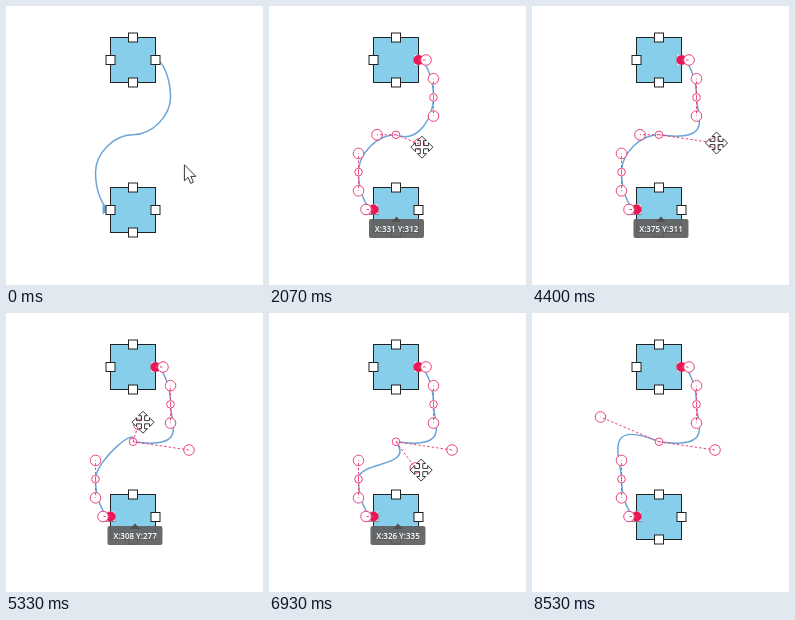
Write an HTML page that moves like this. It is 257 px wide and 279 px high and loops after 9070 ms.

```html
<!DOCTYPE html>
<html lang="en">
<head>
<meta charset="utf-8">
<title>Bezier connector editing</title>
<style>
html, body { margin: 0; width: 100%; height: 100%; overflow: hidden; background: #fff; }
svg { display: block; width: 257px; height: 279px; }
.handles { fill: #fff; stroke: #eb447c; }
.links { fill: none; stroke: #eb447c; stroke-dasharray: 2.5 2; }
.cursor { fill: #fff; stroke: #222; stroke-width: .9; stroke-linejoin: round; }
text { font: 600 8px "Open Sans", "Noto Sans", sans-serif; fill: #fff; text-anchor: middle; }
</style>
</head>
<body>
<svg viewBox="0 0 257 279">
  <g id="nodes" fill="#87ceeb" stroke="#222"></g>
  <path id="curve" fill="none" stroke="#6ba5d7" stroke-width="1.5"/>
  <path d="M97 199.5 104.5 203.5 97 207.5Z" fill="#6ba5d7" stroke="#6ba5d7"/>
  <g id="ports" fill="#fff" stroke="#222"></g>
  <g id="edit">
    <g id="ends"></g>
    <g id="handles" class="handles"></g>
    <path id="links" class="links"/>
  </g>
  <g id="tip">
    <rect x="-27" y="213" width="55" height="19" rx="2" fill="#616161" fill-opacity=".94"/>
    <path d="M-4.5 216 .5 210.5 5.5 216Z" fill="#505050"/>
    <text id="label" x=".5" y="226.3"></text>
  </g>
  <path id="arrow" class="cursor" d="M0 0V16L3.7 12.6 6.3 18.6 9 17.4 6.5 11.6H11.5Z"/>
  <path id="move" class="cursor" d="M0-11 4.5-6.5H1.6V-1.6H6.5V-4.5L11 0 6.5 4.5V1.6H1.6V6.5H4.5L0 11-4.5 6.5H-1.6V1.6H-6.5V4.5L-11 0-6.5-4.5V-1.6H-1.6V-6.5H-4.5Z"/>
</svg>
<script>
const LOOP = 9070, STEP = 1000 / 15, SELECT = 733;
const $ = id => document.getElementById(id);

function add(id, tag, attrs) {
  const el = document.createElementNS('http://www.w3.org/2000/svg', tag);
  for (const k in attrs) el.setAttribute(k, attrs[k]);
  return $(id).appendChild(el);
}

// Two nodes joined by a point-symmetric S of four Bezier pieces
const SIZE = 45, CX = 127, CY = 128.75, RX = 37.5, QUARTER = 18.69;
const x0 = CX - SIZE / 2, tops = [31.5, 181.5];

for (const y of tops) {
  add('nodes', 'rect', { x: x0, y, width: SIZE, height: SIZE });
  for (let i = 0; i < 4; i++) {
    const px = CX + SIZE / 2 * Math.round(Math.cos(i * Math.PI / 2));
    const py = y + SIZE / 2 * (1 + Math.round(Math.sin(i * Math.PI / 2)));
    add('ports', 'rect', { x: px - 4.5, y: py - 4.5, width: 9, height: 9 });
  }
}

const half = [[149.5, CY - 4 * QUARTER], [CX + RX, CY - 2 * QUARTER]];
const upper = [[157, half[0][1]], [CX + RX, CY - 3 * QUARTER], [CX + RX, CY - QUARTER]];
const mirror = ([x, y]) => [2 * CX - x, 2 * CY - y];
const anchors = [...half, [CX, CY], ...half.map(mirror).reverse()];
const controls = (a, b) => [...upper, a, b, ...upper.map(mirror).reverse()];
const joints = anchors.slice(1, 4);

for (const [cx, cy] of [anchors[0], anchors[4]]) {
  add('ends', 'rect', { x: cx - 5, y: cy - 5, width: 10, height: 10, fill: '#d9eef8' });
  add('ends', 'circle', { cx, cy, r: 5, fill: '#e91755' });
}
const dots = [5.3, 5.3, 5.3, 5.3, 5.3, 5.3, 5.3, 5.3].concat(joints.map(() => 3.8))
  .map(r => add('handles', 'circle', { r }));

// Pointer glides: start, end, destination
const glides = [
  [0, 333, 158, 118], [400, 533, 154, 114], [667, 1000, 166, 132], [1000, 1667, 146, CY],
  [2000, 2133, 154, 147], [2133, 2667, 97, 110], [2667, 3400, 224.25, 106.25],
  [3400, 3867, 183, 107], [3867, 4333, 183, 137], [4533, 4800, 108, CY],
  [5133, 5533, 157, 94], [5667, 6267, 22.7, 94.25], [6267, 6400, 22.7, 98],
  [6400, 7240, 197.6, 178.7], [7533, 8133, 68.5, 104], [8200, 8500, 30, 283]
];
const dragA = { from: 2000, to: 4533 };
const dragB = { from: 5133, to: 8200 };

const clamp = (v, lo, hi) => Math.min(Math.max(v, lo), hi);
const ease = u => (1 - Math.cos(Math.PI * u)) / 2;

function pointer(t) {
  let x = 177, y = 159;
  for (const [from, to, gx, gy] of glides) {
    const e = ease(clamp((t - from) / (to - from), 0, 1));
    x += (gx - x) * e;
    y += (gy - y) * e;
  }
  return [x, y];
}

const handle = (drag, t) => pointer(clamp(t, drag.from, drag.to));
const active = (drag, t) => t > drag.from + STEP && t < drag.to;

function middle(c) {
  const xs = [];
  for (let s = 0; s < 4; s++)
    for (let u = 0; u <= 1; u += 1 / 32) {
      const v = 1 - u;
      xs.push(v ** 3 * anchors[s][0] + 3 * v * v * u * c[2 * s][0]
        + 3 * v * u * u * c[2 * s + 1][0] + u ** 3 * anchors[s + 1][0]);
    }
  return (Math.min(...xs) + Math.max(...xs)) / 2;
}

const show = (el, on) => el.style.display = on ? '' : 'none';
const place = (el, x, y) => el.setAttribute('transform', `translate(${x} ${y})`);

function draw(ms) {
  const t = Math.floor((ms % LOOP + 3.4) / STEP) * STEP + .5;
  const a = handle(dragA, t), b = handle(dragB, t);
  const held = active(dragA, t) ? a : active(dragB, t) ? b : null;
  const c = controls(a, b);

  $('curve').setAttribute('d', 'M' + anchors[0] + anchors.slice(1)
    .map((p, i) => `C${c[2 * i]} ${c[2 * i + 1]} ${p}`).join(''));
  $('links').setAttribute('d', c.map((p, i) => `M${anchors[(i + 1) >> 1]}L${p}`).join(''));
  [...c, ...joints].forEach(([x, y], i) => place(dots[i], x, y));
  show($('edit'), t > SELECT);

  show($('tip'), held);
  if (held) {
    const [X, Y] = [held[0] + 98.25, held[1] + 96.25].map(v => Math.round(v / .75));
    $('label').textContent = `X:${X} Y:${Y}`;
    place($('tip'), middle(c), 0);
  }

  // The pointer runs slightly ahead of the handle it drags
  const [x, y] = pointer(t + 15);
  const grip = held || t > SELECT && c.some(p => Math.hypot(p[0] - x, p[1] - y) < 7);
  show($('move'), grip);
  show($('arrow'), !grip);
  place($(grip ? 'move' : 'arrow'), x + 1.5, y);
}

const start = performance.now();
function tick() {
  draw(performance.now() - start);
  requestAnimationFrame(tick);
}
tick();
</script>
</body>
</html>
```
